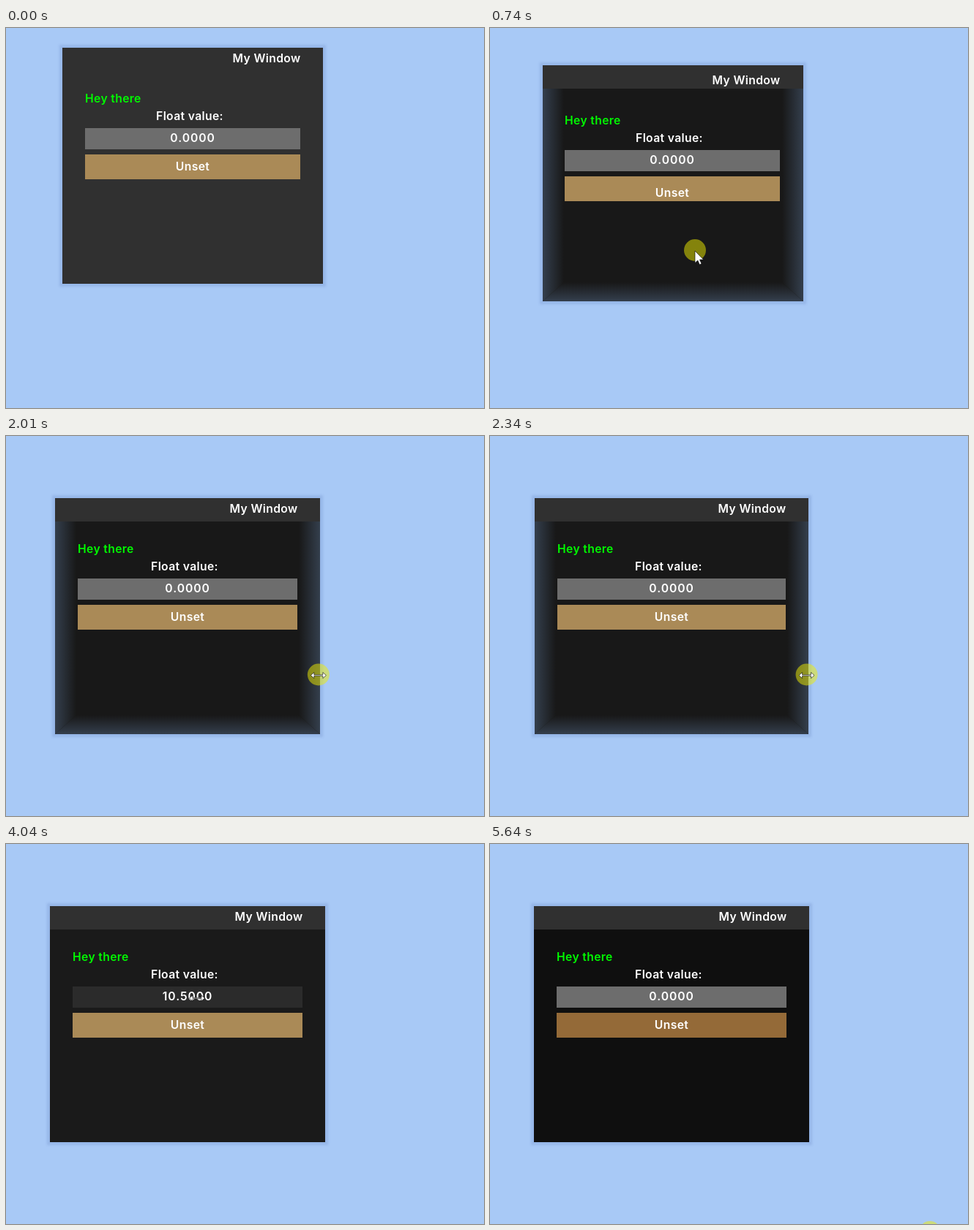
Write an HTML page that moves like this. It is 653x520 px and loops after 5720 ms.

```html
<!DOCTYPE html>
<html lang="en">
<head>
<meta charset="utf-8">
<title>My Window</title>
<style>
  html, body { margin: 0; width: 100%; height: 100%; overflow: hidden; background: #a8c9f6; }
  div, svg { position: absolute; }
  #win {
    height: 323px;
    box-shadow: 0 0 3px 4px rgba(70, 100, 170, .18);
    font: 600 15.7px/20px Inter, "Open Sans", sans-serif;
    letter-spacing: .35px;
    white-space: nowrap;
    color: #fff;
  }
  #bar { left: 0; right: 0; top: 0; height: 32px; background: #303030; }
  #shade { inset: 32px 0 0; overflow: hidden; }
  #shade div { --fade: #343f4d, #181818; }
  .side { top: 0; bottom: 0; width: 29px; }
  .left {
    left: 0;
    background: linear-gradient(90deg, var(--fade));
    clip-path: polygon(0 0, 100% 0, 100% calc(100% - 26px), 0 100%);
  }
  .right {
    right: 0;
    background: linear-gradient(270deg, var(--fade));
    clip-path: polygon(0 0, 100% 0, 100% 100%, 0 calc(100% - 26px));
  }
  .bottom {
    left: 0; right: 0; bottom: 0; height: 26px;
    background: linear-gradient(0deg, var(--fade));
    clip-path: polygon(29px 0, calc(100% - 29px) 0, 100% 100%, 0 100%);
  }
  #content { left: 0; top: 0; width: 100%; }
  .title { right: 30.5px; top: 5px; }
  .hey { left: 31px; top: 60px; color: #00fa00; }
  .label { left: -4px; right: 4px; top: 84px; text-align: center; }
  #field, #button { left: 31px; right: 31px; text-align: center; }
  #field { top: 110px; height: 29px; line-height: 28px; letter-spacing: .9px; }
  #button { top: 146px; height: 34px; line-height: 34px; }
  #caption { left: 0; right: 0; top: 0; }
  #pointer { left: 0; top: 0; }
  #spot { left: -15px; top: -16px; width: 30px; height: 30px; border-radius: 50%; background: rgba(240, 238, 0, .5); }
  #pointer svg { left: 0; top: 0; overflow: visible; fill: #fff; stroke: #000; stroke-width: .6; }
</style>
</head>
<body>
<div id="win">
  <div id="shade">
    <div class="side left"></div>
    <div class="side right"></div>
    <div class="bottom"></div>
  </div>
  <div id="bar"></div>
  <div id="content">
    <div class="title">My Window</div>
    <div class="hey">Hey there</div>
    <div class="label">Float value:</div>
    <div id="field"></div>
    <div id="button"><div id="caption">Unset</div></div>
  </div>
</div>
<div id="pointer">
  <div id="spot"></div>
  <svg id="arrow" width="1" height="1"><path d="M0 0V16.5L3.8 13L6.3 18.8L9 17.6L6.5 12H11.6Z"/></svg>
  <svg id="resize" width="1" height="1"><path d="M-10.5 0L-6-4V-.7H6V-4L10.5 0L6 4V.7H-6V4Z"/></svg>
</div>
<script>
  const LOOP = 5720, TICKS = 68, LEAD = 20;
  const $ = id => document.getElementById(id);
  const [win, shade, content, field, button, caption, pointer, spot, arrow, resize] =
    ['win', 'shade', 'content', 'field', 'button', 'caption', 'pointer', 'spot', 'arrow', 'resize'].map($);

  // All times below are in ticks, 68 to a loop.
  const ramp = (n, a, b) => Math.min(1, Math.max(0, (n - a) / (b - a)));
  const within = (spans, n) => spans.some(([a, b]) => n >= a && n < b);

  // Corners of the pointer's path: [tick, x, y]
  const path = [
    [0, 731, 606], [5, 286, 269],                   // enter
    [7, 286, 269], [9, 280, 305], [10.2, 280, 327], // drag the window
    [13, 279, 328], [15, 406, 328],                 // go to the right edge
    [21, 424, 327.5], [22, 424, 327.5], [29, 434, 327.5], [30, 434, 327.5],
    [31, 383, 268], [34, 250, 207],                 // go to the number
    [38, 250, 209], [46, 261, 211], [48, 261, 211],
    [51, 250, 253], [54, 262, 262],                 // press the button
    [60, 551, 445], [63, 601, 532], [TICKS, 601, 532]
  ];
  const pressed = [[8, 13], [23, 30], [38, 48], [51, 54], [67, TICKS]];
  const resizing = [[18, 31], [34, 49]];

  function pointerAt(n) {
    const i = path.findIndex(k => k[0] > n);
    const [a, x0, y0] = path[i - 1], [b, x1, y1] = path[i];
    const p = ramp(n, a, b);
    return [x0 + (x1 - x0) * p, y0 + (y1 - y0) * p];
  }

  // Corner of the window while it is dragged
  function cornerAt(n) {
    const p = ramp(n, 7, 10.2);
    return [Math.round(77 - 7 * (1 - (1 - p) ** 2.4)), Math.round(27 + 58 * p)];
  }

  const shift = (el, [x, y], [fromX, fromY] = [0, 0]) =>
    el.style.transform = `translate(${x - fromX}px, ${y - fromY}px)`;
  const grey = v => `rgb(${v}, ${v}, ${v})`;
  const show = (el, on) => el.style.visibility = on ? 'visible' : 'hidden';

  function draw(n) {
    // The content leads the window, and the caption leads the content.
    const [frame, inner, text] = [.68, .34, 0].map(lag => cornerAt(n - lag));
    const grow = Math.round(10 * ramp(n, 22, 29));
    win.style.left = frame[0] - grow + 'px';
    win.style.top = frame[1] + 'px';
    win.style.width = 356 + 2 * grow + 'px';
    shift(content, inner, frame);
    shift(caption, text, inner);

    const hover = ramp(n, 2, 5), leave = ramp(n, 28, 30);
    shade.style.opacity = hover - leave;
    win.style.background = grey(48 - 24 * hover + 2 * leave - 11 * ramp(n, 53, 60));

    const number = n < 52 ? Math.round(21 * ramp(n, 38, 46)) / 2 : 0;
    field.textContent = number.toFixed(4);
    field.style.background =
      grey(109 - 10 * ramp(n, 29, 30) - 56 * ramp(n, 44, 45) + 66 * ramp(n, 49, 51));
    button.style.background = `color-mix(in srgb, #aa8a57, #946a38 ${100 * ramp(n, 49, 51)}%)`;

    shift(pointer, pointerAt(n));
    const sizing = within(resizing, n);
    show(spot, within(pressed, n));
    show(resize, sizing);
    show(arrow, !sizing && n > 1);
  }

  const start = performance.now();
  function tick() {
    const t = (performance.now() - start) % LOOP;
    draw(Math.min(TICKS - 1, Math.floor((t + LEAD) / LOOP * TICKS)));
    requestAnimationFrame(tick);
  }
  tick();
</script>
</body>
</html>
```
